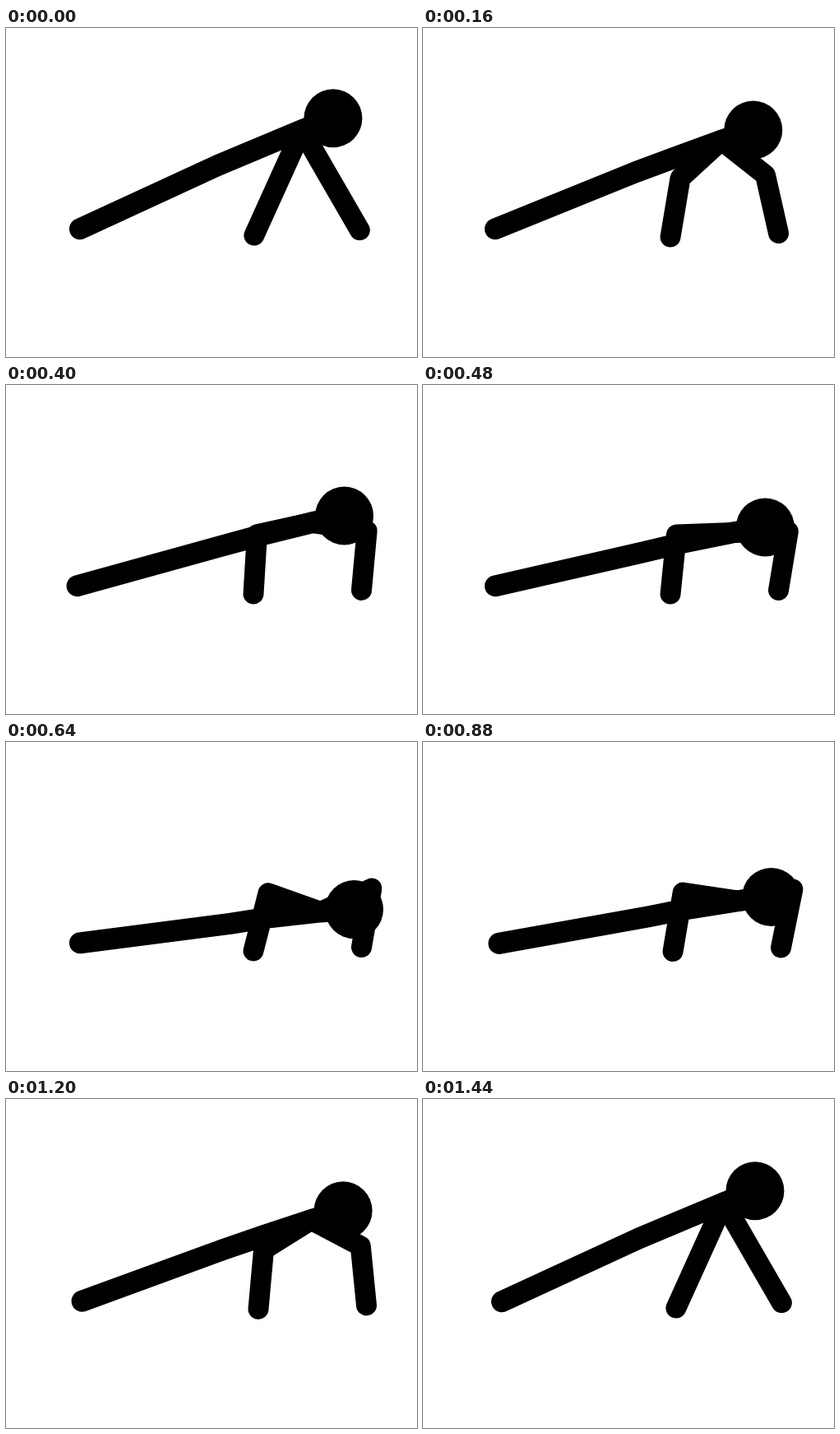
Recreate the animation shown at these times as an HTML page with a canvas. Size 500 by 400 pixels, loop 1520 ms.

```html
<!DOCTYPE html>
<html lang="en">
<head>
<meta charset="utf-8">
<title>Push-up</title>
<style>
  html, body { margin: 0; width: 100%; height: 100%; overflow: hidden; background: #fff; }
  canvas { display: block; }
</style>
</head>
<body>
<canvas id="stage" width="500" height="400"></canvas>
<script>
const ctx = document.getElementById('stage').getContext('2d');
const STEP = 80, STEPS = 19;
const UPPER_ARM = 68, FOREARM = 72.5;

// Point at a distance and a rising angle in degrees from an origin
function polar([x, y], distance, degrees) {
  const angle = degrees * Math.PI / 180;
  return [x + distance * Math.cos(angle), y - distance * Math.sin(angle)];
}

function limb(width, ...points) {
  ctx.lineWidth = width;
  ctx.beginPath();
  points.forEach(p => ctx.lineTo(...p));
  ctx.stroke();
}

// Two-bone arm; a hand out of reach is pulled in. side: -1 bends left, 1 bends right
function arm([sx, sy], [hx, hy], side) {
  const distance = Math.hypot(hx - sx, hy - sy);
  const reach = Math.min(distance, UPPER_ARM + FOREARM);
  const ux = (hx - sx) / distance, uy = (hy - sy) / distance;
  const along = (reach ** 2 + UPPER_ARM ** 2 - FOREARM ** 2) / (2 * reach);
  const bend = side * Math.sqrt(Math.max(0, UPPER_ARM ** 2 - along ** 2));
  const elbow = [sx + ux * along + uy * bend, sy + uy * along - ux * bend];
  limb(25, [sx, sy], elbow, [sx + ux * reach, sy + uy * reach]);
}

function draw(now) {
  const step = Math.floor(now / STEP) % STEPS;
  const depth = Math.min(step, STEPS - 1 - step);
  const lean = 23.6 - 1.04 * depth ** (4 / 3);

  // The body swings about the foot, with a slight arch in the back
  const foot = [88 + 2 * Math.cos(depth / 8 * 2 * Math.PI), 244.3];
  const hip = polar(foot, 184, lean * 1.05);
  const chest = polar(foot, 235, lean + 0.7);
  const shoulder = polar(foot, 295.5, lean + 0.4);
  const head = polar(foot, 336, lean);

  ctx.fillStyle = '#fff';
  ctx.fillRect(0, 0, 500, 400);
  ctx.fillStyle = ctx.strokeStyle = '#000';
  ctx.lineCap = ctx.lineJoin = 'round';

  // The figure creeps to the right while rising
  const rise = Math.max(0, step - 8);
  ctx.save();
  ctx.translate(Math.min(rise, 6), rise * 0.2);
  limb(26, foot, hip, chest, shoulder, head);
  arm(shoulder, [301, 254], -1);
  arm(shoulder, [432.5, 249.5], 1);
  ctx.beginPath();
  ctx.arc(...head, 35.5, 0, Math.PI * 2);
  ctx.fill();
  ctx.restore();
}

const start = performance.now();
function tick() {
  draw(performance.now() - start);
  requestAnimationFrame(tick);
}
tick();
</script>
</body>
</html>
```
